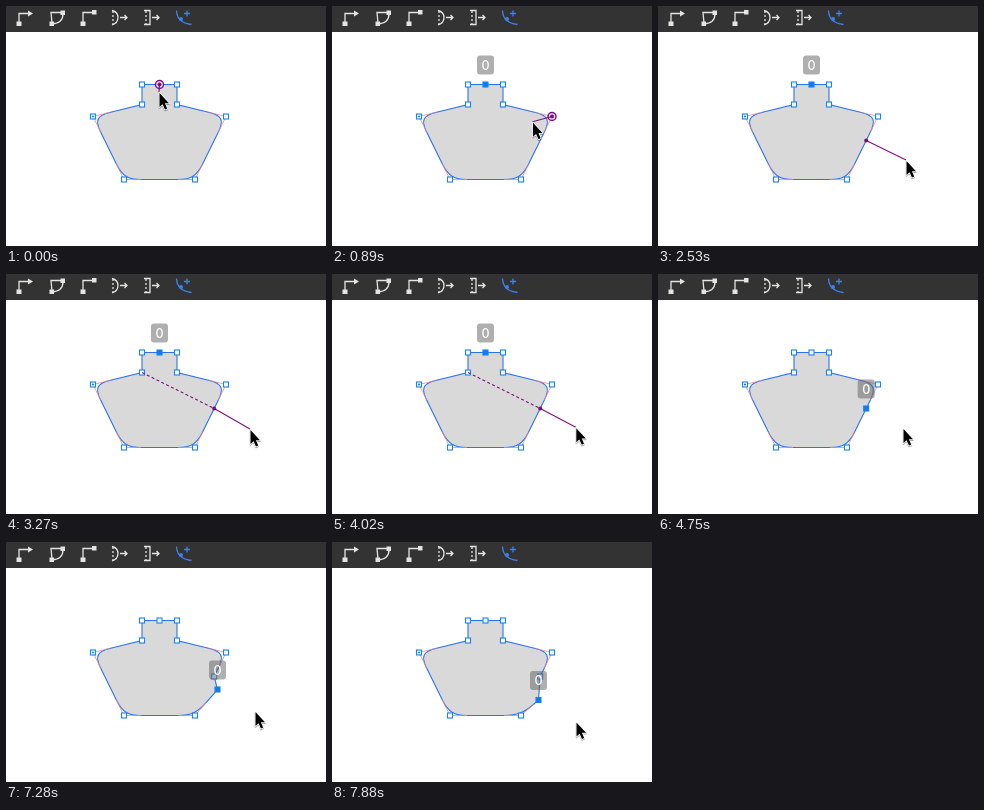
Animation, 320 px wide and 240 px high, one loop 8 s. Source, as an HTML page:

```html
<!DOCTYPE html>
<html lang="en">
<head>
<meta charset="utf-8">
<title>Add node tool</title>
<style>
  html, body { margin: 0; width: 100%; height: 100%; overflow: hidden; background: #fff; }
  svg { display: block; width: 320px; height: 240px; }
  .icon { fill: none; stroke: #e4e4e4; stroke-width: 1.3; }
  .icon .solid { fill: #e4e4e4; stroke: none; }
  .icon.on { stroke: #3b82f0; }
  .icon.on .solid { fill: #3b82f0; }
  #shape { fill: #d9d9d9; stroke: #2b73f4; stroke-width: 1.1; }
  #arms { fill: none; stroke: #f08a8a; stroke-width: .8; }
  .node { fill: #fff; stroke: #1a82ee; stroke-width: 1.1; }
  .node.picked { fill: #0f7cf0; }
  .guide { stroke: #80107c; stroke-width: 1.1; }
  #dash { stroke-dasharray: 3 2.4; }
  #ring { fill: #f2e6f4; stroke: #850a8c; stroke-width: 1.5; }
  #dot { fill: #74107a; }
  #badge rect { fill: rgb(95, 95, 95); fill-opacity: .5; }
  #badge text { font: 500 12.5px Inter, "Open Sans", sans-serif; fill: #fff; text-anchor: middle; }
  #cursor { stroke: #fff; stroke-width: 1.6; stroke-linejoin: round; paint-order: stroke;
    filter: drop-shadow(0 1px .7px rgba(0, 0, 0, .35)); }
</style>
</head>
<body>
<svg viewBox="0 0 320 240">
  <rect width="320" height="26" fill="#333"/>
  <g class="icon">
    <path d="M13 17V7.5H23"/>
    <path class="solid" d="M10.5 15.500h5v4.500h-5zM22 4.500l5 3-5 3z"/>
  </g>
  <g class="icon">
    <path d="M46 17L45 6.500H57M46 18Q57 17 57 8"/>
    <path class="solid" d="M43.500 15.500h4.500v4.500h-4.500zM54.500 4.500h4.500v4.500h-4.500z"/>
  </g>
  <g class="icon">
    <path d="M77 17V6.500H87"/>
    <path class="solid" d="M74.500 15.500h5v4.500h-5zM86 4h4.500v4.500h-4.500z"/>
  </g>
  <g class="icon">
    <path d="M106 4.500Q112 6 112 11.500T106 19"/>
    <path d="M107 5V19" stroke-dasharray="2 2"/>
    <path d="M114 11.500H121M118.500 9L121 11.500L118.500 14"/>
  </g>
  <g class="icon">
    <path d="M138 4.500H144V18.500H138"/>
    <path d="M140 5V19" stroke-dasharray="2 2"/>
    <path d="M146 11.500H153M150.500 9L153 11.500L150.500 14"/>
  </g>
  <g class="icon on">
    <path d="M170.500 4.500Q171 17 185.500 18.500M181 4.500V10.500M178 7.500H184"/>
    <circle class="solid" cx="175" cy="13" r="2"/>
  </g>

  <path id="shape"/>
  <path id="arms"/>
  <g id="nodes"></g>
  <line id="dash" class="guide"/>
  <circle id="ring" r="4"/>
  <line id="line" class="guide"/>
  <circle id="dot" r="2"/>
  <g id="badge"><rect x="-8.500" y="-9.500" width="17" height="19" rx="3"/><text y="4.500">0</text></g>
  <path id="cursor" d="M.5 1V15L3.600 12.200L6 17.500L8.200 16.500L5.900 11.300H10Z"/>
</svg>
<script>
const LOOP = 8000, STEP = 148;
const PICK = 300, ADD = 4610, LEAVE = 5050, HOVER = 5800, DRAG = 6982;
const REACH = 23, SNAP = 4.2, ROUND = 17, PULL = 0.75;
const START = [153, 86], GRAB = [37.5, 21.5];

const pt = (x, y, soft = false) => Object.assign([x, y], { soft });
const [NECK, TOP, SIDE, ORIGIN] = [pt(136, 98.5), pt(153.5, 78.5), pt(208.2, 134.5), pt(87, 110.5, true)];

// Pointer moves in whole steps, along a line or a bend through "via".
const moves = [
  { at: 740, steps: 4, to: [249, 141], via: [200, 118] },
  { at: 1482, steps: 2, to: [220.5, 88] },
  { at: 1778, steps: 6, to: [248, 154], via: [264, 200] },
  { at: 2670, steps: 5, to: [244, 155], via: [250, 146] },
  { at: 3410, steps: 2, to: [242, 152] },
  { at: 3720, steps: 5, to: [245, 154] },
  { at: LEAVE, steps: 2, to: [280, 197] },
  { at: HOVER, steps: 3, to: [244, 158] },
  { at: 6244, steps: 4, to: [244, 160] },
  { at: DRAG, steps: 2, to: [265, 174] },
  { at: 7278, steps: 1, to: [249, 169] },
  { at: 7426, steps: 4, to: [244, 179.5], via: [266, 208] }
];

const $ = id => document.getElementById(id);
const set = (el, attrs) => { for (const k in attrs) el.setAttribute(k, attrs[k]); };
const show = (id, on) => { $(id).style.display = on ? '' : 'none'; };
const place = (id, [x, y]) => set($(id), { transform: `translate(${x} ${y})` });
const join = (id, a, b) => set($(id), { x1: a[0], y1: a[1], x2: b[0], y2: b[1] });
const dist = (a, b) => Math.hypot(a[0] - b[0], a[1] - b[1]);
const mix = (a, b, u) => [a[0] + (b[0] - a[0]) * u, a[1] + (b[1] - a[1]) * u];
const closest = (points, p) => points.reduce((a, b) => dist(b, p) < dist(a, p) ? b : a);

function pointer(t) {
  let pos = START;
  for (const { at, steps, to, via } of moves) {
    if (t < at) break;
    const u = Math.min(1, (Math.floor((t - at) / STEP) + 1) / steps);
    const mid = via || mix(pos, to, 0.5);
    pos = mix(mix(pos, mid, u), mix(mid, to, u), u);
  }
  return pos;
}

function corners(t, bend) {
  return [
    NECK, pt(136, 78.5), TOP, pt(171, 78.5), pt(171, 98.5), pt(220, 110.5, true),
    ...(t >= ADD ? [SIDE] : []), ...(bend ? [bend] : []),
    pt(189, 173.5, true), pt(118, 173.5, true), ORIGIN
  ];
}

// Outline with soft corners, plus the thin arms that reach each soft corner.
function drawShape(list) {
  let d = '', arms = '';
  list.forEach((c, i) => {
    const cmd = i ? 'L' : 'M';
    if (!c.soft) { d += cmd + c; return; }
    const toward = n => mix(c, n, Math.min(1, ROUND / dist(c, n)));
    const a = toward(list[i - 1]), b = toward(list[(i + 1) % list.length]);
    d += `${cmd}${a}C${mix(a, c, PULL)} ${mix(b, c, PULL)} ${b}`;
    arms += `M${a}L${c}L${b}`;
  });
  set($('shape'), { d: d + 'Z' });
  set($('arms'), { d: arms });
}

function nearest(p) {
  const path = $('shape'), points = [];
  for (let s = 0, end = path.getTotalLength(); s < end; s += 0.5) {
    const { x, y } = path.getPointAtLength(s);
    points.push([x, y]);
  }
  return closest(points, p);
}

function node(n, picked) {
  const cls = picked ? 'node picked' : 'node';
  return `<rect class="${cls}" x="${n[0] - 2.5}" y="${n[1] - 2.5}" width="5" height="5"/>`;
}

function drawGuides(t, p, list) {
  const on = t < PICK || (t >= 740 && t < ADD) || (t >= HOVER && t < DRAG);
  const corner = closest(list, p);
  const ring = dist(corner, p) < REACH;
  let hit = ring ? corner : nearest(p);
  const snap = !ring && t >= 2670 && t < ADD && dist(hit, SIDE) < SNAP;
  if (snap) hit = SIDE;
  show('line', on);
  show('dot', on);
  show('ring', on && ring);
  show('dash', on && snap);
  join('line', hit, p);
  join('dash', NECK, hit);
  place('dot', hit);
  place('ring', hit);
}

function draw(t) {
  const p = pointer(t);
  const bend = t >= DRAG ? pt(p[0] - GRAB[0], p[1] - GRAB[1]) : null;
  const picked = bend || (t >= ADD ? SIDE : t >= PICK ? TOP : null);
  const list = corners(t, bend);

  drawShape(list);
  $('nodes').innerHTML = list.map(n => node(n, n === picked)).join('') +
    `<circle cx="${ORIGIN[0]}" cy="${ORIGIN[1]}" r="1.1" fill="#1a82ee"/>`;
  drawGuides(t, p, list);
  show('badge', t >= 450 && !(t >= ADD && t < 4750));
  if (picked) place('badge', [picked[0], picked[1] - 19.5]);
  place('cursor', p);
}

const t0 = performance.now();
function tick() {
  draw((performance.now() - t0) % LOOP);
  requestAnimationFrame(tick);
}
tick();
</script>
</body>
</html>
```
